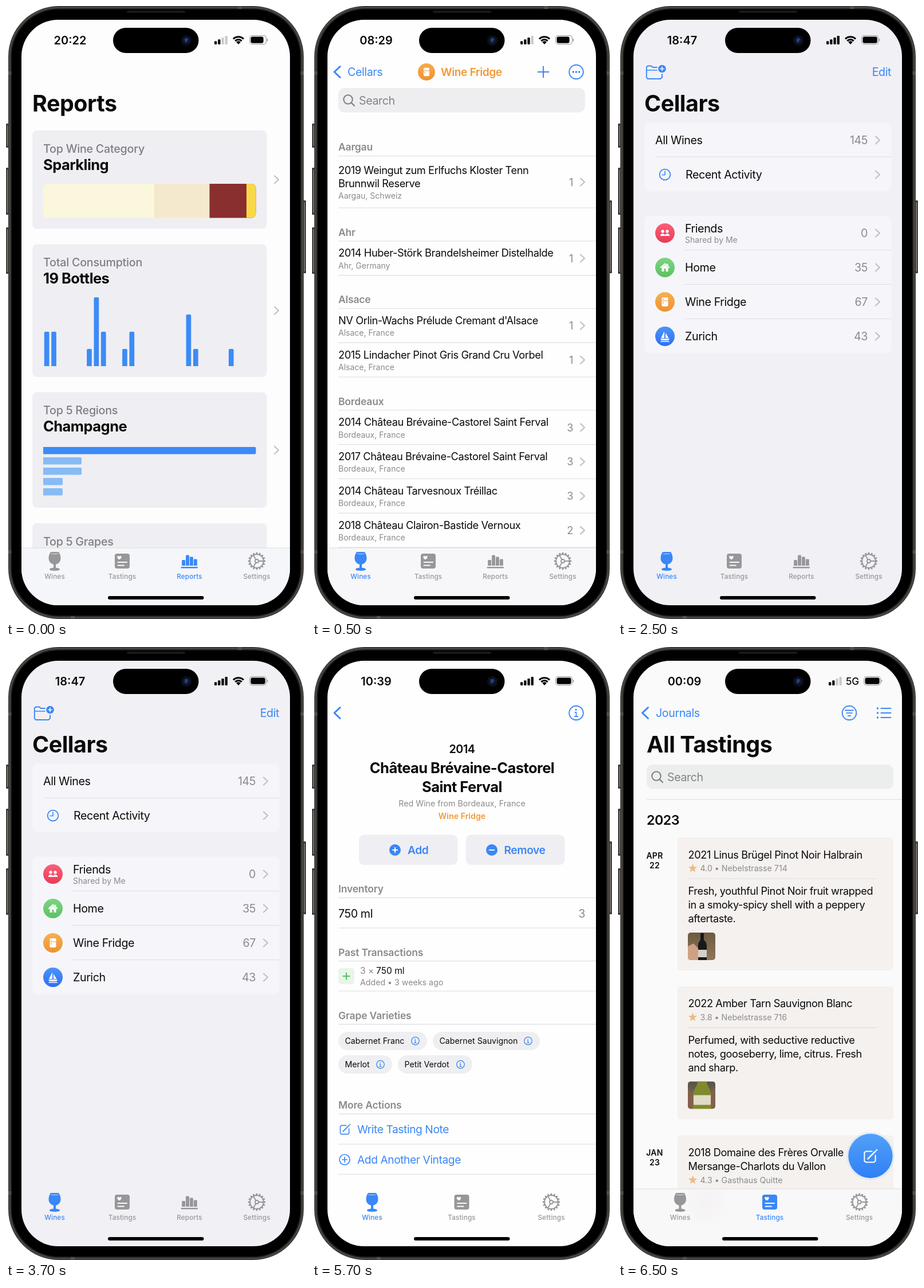
Write an HTML page with a canvas that moves like this. It is 524 px wide and 1069 px high and loops after 8000 ms.

```html
<!DOCTYPE html>
<html lang="en">
<head>
<meta charset="utf-8">
<title>Wine cellar app</title>
<style>
html, body { margin: 0; width: 100%; height: 100%; overflow: hidden; background: #fff; }
canvas { display: block; width: 524px; height: 1069px; }
</style>
</head>
<body>
<canvas id="stage"></canvas>
<script>
const W = 524, H = 1069;
const canvas = document.getElementById('stage');
const ratio = window.devicePixelRatio || 1;
canvas.width = W * ratio;
canvas.height = H * ratio;
const c = canvas.getContext('2d');

const BLUE = '#3a87f7', ORANGE = '#f19a38', INK = '#0a0a0a', GRAY = '#8b8b8f';
const TAB = '#97979a', RULE = '#dedee1', CARD = '#efeef2';
const BODY = 18.2, ACTION = 19.2, TITLE = 39.4;

// Text is placed by the middle of its capitals.
function text(s, x, cy, size = 19.7, weight = 400, color = INK, align = 'left', track) {
  const em = track ?? (size < 16 ? 0 : size < 18 ? -0.01 : size < 30 ? -0.022 : -0.012);
  c.font = `${weight} ${size}px Inter, Roboto, sans-serif`;
  c.letterSpacing = em * size + 'px';
  c.textAlign = align;
  c.textBaseline = 'alphabetic';
  c.fillStyle = color;
  c.fillText(s, x, cy + size * 0.364);
}
function box(x, y, w, h, r, fill) {
  c.beginPath();
  c.roundRect(x, y, w, h, r);
  c.fillStyle = fill;
  c.fill();
}
function disc(x, y, r, fill) {
  c.beginPath();
  c.arc(x, y, r, 0, 7);
  c.fillStyle = fill;
  c.fill();
}
function ring(x, y, r, color, lw = 1.8) {
  c.beginPath();
  c.arc(x, y, r, 0, 7);
  c.strokeStyle = color;
  c.lineWidth = lw;
  c.stroke();
}
function line(points, color, lw = 2) {
  c.beginPath();
  for (let i = 0; i < points.length; i += 2) c.lineTo(points[i], points[i + 1]);
  c.strokeStyle = color;
  c.lineWidth = lw;
  c.lineCap = c.lineJoin = 'round';
  c.stroke();
}
function shape(d, fill) {
  c.fillStyle = fill;
  c.fill(new Path2D(d));
}
function at(x, y, draw, k = 1) {
  c.save();
  c.translate(x, y);
  c.scale(k, k);
  draw();
  c.restore();
}
function fade(y, h, top, bottom) {
  const g = c.createLinearGradient(0, y, 0, y + h);
  g.addColorStop(0, top);
  g.addColorStop(1, bottom);
  return g;
}
const rule = (y, x = 46, end = 496) => box(x, y - 0.6, end - x, 1.2, 0, RULE);
const chevron = (x, y) => line([x - 3.5, y - 6.5, x + 3.5, y, x - 3.5, y + 6.5], '#c1c1c5', 2.2);
const back = x => line([x + 10, 105.5, x, 115, x + 10, 124.5], BLUE, 3);
const plus = (x, y, r, color, lw) => {
  line([x - r, y, x + r, y], color, lw);
  line([x, y - r, x, y + r], color, lw);
};
function info(x, y, r, lw) {
  ring(x, y, r, BLUE, lw);
  disc(x - r * 0.04, y - r * 0.46, r * 0.13, BLUE);
  line([x - r * 0.18, y - r * 0.1, x, y - r * 0.1, x, y + r * 0.5], BLUE, lw * 0.9);
  line([x - r * 0.24, y + r * 0.5, x + r * 0.24, y + r * 0.5], BLUE, lw * 0.9);
}
function compose(x, y, color, k) {
  at(x, y, () => {
    line([3, -8, -6, -8, -8, -6, -8, 6, -6, 8, 6, 8, 8, 6, 8, -2], color, 1.7);
    line([-3, 3, 8, -8], color, 2);
    disc(9.8, -9.8, 1.2, color);
  }, k);
}
function search(x, y, fill) {
  box(x, y, 431, 42.5, 11, fill);
  ring(x + 17, y + 20, 7.7, '#7e7e83', 2);
  line([x + 23, y + 26, x + 28, y + 31], '#7e7e83', 2.3);
  text('Search', x + 36, y + 21.7, 19.7, 400, '#838388');
}

// Tab bar
const icons = {
  Wines(color) {
    shape('M-7 -16H7C9.3 -13 10.5 -9 10.5 -5C10.5 1 6.5 5 2 5.6V11.6C6 12 9 13 9 14.6C9 17.8 -9 17.8 -9 14.6C-9 13 -6 12 -2 11.6V5.6C-6.5 5 -10.5 1 -10.5 -5C-10.5 -9 -9.3 -13 -7 -16Z', color);
    line([-6, -13, 0, -12.3, 6, -13], 'rgba(255,255,255,.6)', 1.2);
  },
  Tastings(color) {
    box(-13, -13, 26, 26, 4, color);
    shape('M-5 -2.4C-12 -7 -7.5 -11 -5 -8C-2.5 -11 2 -7 -5 -2.4Z', '#fafafc');
    line([-7.5, 2, 8, 2], '#fafafc', 2);
    line([-7.5, 7.5, 3, 7.5], '#fafafc', 2);
  },
  Reports(color) {
    [10, 18.5, 15.5, 11.5].forEach((h, i) => box(-13.3 + 6.9 * i, 8 - h, 5.9, h, [1.5, 1.5, 0, 0], color));
    box(-15, 10, 29.5, 2.4, 1, color);
  },
  Settings(color) {
    ring(0, 0, 11.8, color, 2);
    ring(0, 0, 3, color, 1.8);
    for (let i = 0; i < 16; i++) {
      c.save();
      c.rotate(i * Math.PI / 8);
      box(12, -1.5, 3.2, 3, 1, color);
      c.restore();
    }
    for (let i = 0; i < 3; i++) {
      const a = i * Math.PI * 2 / 3, x = Math.cos(a), y = Math.sin(a);
      line([x * 3.6, y * 3.6, x * 11, y * 11], color, 1.9);
    }
  }
};
function tabs(active, spots, fill, border) {
  if (fill) box(27, 945, 469, 102, 0, fill);
  if (border) rule(945, border);
  for (const [name, x] of Object.entries(spots)) {
    const color = name === active ? BLUE : TAB;
    at(x, 968, () => icons[name](color));
    text(name, x, 995, 11.7, 500, color, 'center', 0.015);
  }
}
const FOUR = { Wines: 85, Tastings: 203, Reports: 320.5, Settings: 438 };

// Screens
function reports() {
  text('Reports', 46, 170, TITLE, 700);
  const card = (y, h, label, value) => {
    box(46, y, 409.5, h, 8, CARD);
    text(label, 65, y + 31.5, 19.7, 500, '#7f7f83', 'left', -0.012);
    if (value) {
      text(value, 65, y + 59.5, 25.5, 700);
      chevron(472.5, y + (h === 201.5 ? 101 : h / 2));
    }
  };
  card(217, 171.5, 'Top Wine Category', 'Sparkling');
  c.save();
  c.beginPath();
  c.roundRect(65, 310, 371.5, 59.5, 8);
  c.clip();
  [[65, '#fbf7dc'], [259, '#f4e9cc'], [355.5, '#8a2f2f'], [420, '#f9d847']]
    .forEach(([x, fill]) => box(x, 310, 372, 60, 0, fill));
  c.restore();

  card(415.5, 231.5, 'Total Consumption', '19 Bottles');
  const bottles = { 0: 2, 1: 2, 6: 1, 7: 4, 8: 2, 11: 1, 12: 2, 20: 3, 21: 1, 26: 1 };
  for (const [i, n] of Object.entries(bottles))
    box(66.8 + 12.39 * i, 628 - 30 * n, 8.7, 30 * n, [2, 2, 0, 0], '#3c8bf6');

  card(673.5, 201.5, 'Top 5 Regions', 'Champagne');
  [371.5, 67, 67, 34, 34].forEach((w, i) =>
    box(65, 769 + 18 * i, w, 12.6, [0, 2, 2, 0], i ? '#87bbf5' : '#3c8bf6'));

  card(902, 100, 'Top 5 Grapes');
  tabs('Reports', FOUR, '#f5f6fa', 27);
}

function fridge(x, y, k) {
  at(x, y, () => {
    box(-5.5, -8, 11, 16, 2, '#fff');
    box(-5.5, -2.6, 11, 1.1, 0, ORANGE);
    box(-3.5, -6, 1.2, 2.2, 0, ORANGE);
    box(-3.5, 0, 1.2, 3, 0, ORANGE);
  }, k);
}

function wineList() {
  back(39);
  text('Cellars', 62, 115, 19.7, 400, BLUE);
  disc(200, 115, 15, fade(100, 30, '#f6ad4d', '#ee9230'));
  fridge(200, 115, 0.92);
  text('Wine Fridge', 225, 115, ACTION, 600, ORANGE);
  plus(404, 115, 9.5, BLUE, 2);
  ring(461.5, 115, 12.3, BLUE, 1.9);
  [-5.2, 0, 5.2].forEach(d => disc(461.5 + d, 115, 1.8, BLUE));
  search(46, 143, '#eeeef0');

  const head = (s, y) => {
    text(s, 46, y - 15.5, 17.5, 600, GRAY);
    rule(y);
  };
  const count = (n, y) => {
    text(n, 456, y, BODY, 400, GRAY, 'right');
    chevron(472.5, y);
  };
  const row = (y, title, place, n) => {
    text(title, 46, y + 20.8, BODY);
    text(place, 46, y + 42.5, 14, 400, GRAY);
    count(n, y + 30);
    rule(y + 59.7);
  };
  head('Aargau', 261.5);
  text('2019 Weingut zum Erlfuchs Kloster Tenn', 46, 286, BODY);
  text('Brunnwil Reserve', 46, 309.5, BODY);
  text('Aargau, Schweiz', 46, 331, 14, 400, GRAY);
  count('1', 307);
  rule(352);
  head('Ahr', 410);
  row(410, '2014 Huber-Störk Brandelsheimer Distelhalde', 'Ahr, Germany', '1');
  head('Alsace', 527.5);
  row(527.5, "NV Orlin-Wachs Prélude Cremant d'Alsace", 'Alsace, France', '1');
  row(587.3, '2015 Lindacher Pinot Gris Grand Cru Vorbel', 'Alsace, France', '1');
  head('Bordeaux', 705);
  [['2014 Château Brévaine-Castorel Saint Ferval', '3'],
   ['2017 Château Brévaine-Castorel Saint Ferval', '3'],
   ['2014 Château Tarvesnoux Tréillac', '3'],
   ['2018 Château Clairon-Bastide Vernoux', '2']]
    .forEach(([name, n], i) => row(705 + 59.8 * i, name, 'Bordeaux, France', n));
  tabs('Wines', FOUR, '#f7f7f9', 27);
}

const badges = [
  ['Friends', '0', '#f9607a', '#ea3c55', () => {
    [-4, 4].forEach(x => {
      disc(x, -3, 2.7, '#fff');
      shape(`M${x - 4.3} 5C${x - 4} -0.5 ${x + 4} -0.5 ${x + 4.3} 5Z`, '#fff');
    });
  }],
  ['Home', '35', '#7ed483', '#5cc163', () => {
    line([-7.5, 0, 0, -6.5, 7.5, 0], '#fff', 1.8);
    shape('M-5.5 0L0 -4.6L5.5 0V7H1.6V2H-1.6V7H-5.5Z', '#fff');
    box(3.5, -6.5, 2, 4, 0, '#fff');
  }],
  ['Wine Fridge', '67', '#f7b04f', '#ee9231', () => fridge(0, 0, 1)],
  ['Zurich', '43', '#4a94f8', '#2f6ff0', () => {
    shape('M-1 -9V3H-7Z M1 -6L6.5 3H1Z M-8 4H8L6 7H-6Z', '#fff');
    line([-7, 9, 7, 9], '#fff', 1.3);
  }]
];

function cellars() {
  line([74, 127, 52, 127, 49.8, 124.8, 49.8, 106.5, 52, 104.5, 58, 104.5, 61, 107, 68, 107], BLUE, 1.9);
  line([74, 127, 77, 124.5, 77, 119], BLUE, 1.9);
  line([50, 112, 68, 112], BLUE, 1.7);
  disc(77, 109.5, 6.8, BLUE);
  plus(77, 109.5, 3.2, '#fff', 1.6);
  text('Edit', 477, 115, 19.7, 400, BLUE, 'right');
  text('Cellars', 46, 170, TITLE, 700);

  box(46, 203, 431.5, 120.5, 10, '#f6f6fa');
  text('All Wines', 65, 234);
  text('145', 436, 234, 19.7, 400, GRAY, 'right');
  chevron(453.5, 234);
  rule(263, 65, 477);
  ring(82, 294, 9.4, BLUE, 1.8);
  line([82, 288, 82, 294.5, 77, 294.5], BLUE, 1.6);
  text('Recent Activity', 118, 294);
  chevron(453.5, 294);

  box(46, 365.5, 431.5, 240, 10, '#f6f6fa');
  badges.forEach(([name, n, top, bottom, icon], i) => {
    const y = 396 + 60 * i;
    disc(82, y, 17, fade(y - 17, 34, top, bottom));
    at(82, y, icon);
    text(name, 117, i ? y : 388);
    text(n, 436, y, 19.7, 400, GRAY, 'right');
    chevron(453.5, y);
    if (i) rule(y - 30.5, 116, 477);
  });
  text('Shared by Me', 117, 408, 14, 400, GRAY);
  tabs('Wines', FOUR);
}

function wine() {
  back(39);
  info(461.5, 115, 12.3, 1.9);
  text('2014', 262, 178, 19.7, 600, INK, 'center');
  text('Château Brévaine-Castorel', 262, 211, 25.5, 700, INK, 'center');
  text('Saint Ferval', 262, 244, 25.5, 700, INK, 'center');
  text('Red Wine from Bordeaux, France', 262, 273, 14.2, 400, GRAY, 'center');
  text('Wine Fridge', 262, 295, 14.2, 600, ORANGE, 'center');

  box(82, 327.5, 172.5, 52.5, 9, CARD);
  box(269, 327.5, 172.5, 52.5, 9, CARD);
  disc(145, 354, 10, BLUE);
  plus(145, 354, 4, '#fff', 2);
  text('Add', 167, 354, ACTION, 600, BLUE);
  disc(314, 354, 10, BLUE);
  line([310, 354, 318, 354], '#fff', 2);
  text('Remove', 335.5, 354, ACTION, 600, BLUE);

  [['Inventory', 422], ['Past Transactions', 532.3], ['Grape Varieties', 642.5], ['More Actions', 799]]
    .forEach(([s, y]) => {
      text(s, 46, y, 17.5, 600, GRAY);
      rule(y + 15.4);
    });
  text('750 ml', 46, 464.5);
  text('3', 477, 464.5, 19.7, 400, GRAY, 'right');
  rule(490);

  box(46, 560, 28, 28, 5, '#e8f6e9');
  plus(60, 574, 5.6, '#56bf5d', 2);
  text('3 ×', 84, 564.5, 15.6, 400, GRAY);
  text('750 ml', 112, 564.5, 15.6);
  text('Added • 3 weeks ago', 84, 585, 14.2, 400, GRAY);
  rule(600);

  [['Cabernet Franc', 46, 671, 155], ['Cabernet Sauvignon', 211, 671, 187],
   ['Merlot', 46, 712, 94], ['Petit Verdot', 150, 712, 130]].forEach(([s, x, y, w]) => {
    box(x, y, w, 32, 16, '#efeff1');
    text(s, x + 11.5, y + 16, 14.2);
    info(x + w - 20.5, y + 16, 6.8, 1.3);
  });

  compose(57, 842, BLUE, 0.95);
  text('Write Tasting Note', 79, 841.5, ACTION, 400, BLUE);
  rule(867);
  ring(57, 894, 9, BLUE, 1.7);
  plus(57, 894, 4.3, BLUE, 1.7);
  text('Add Another Vintage', 79, 894, ACTION, 400, BLUE);
  rule(919.5);
  tabs('Wines', { Wines: 105, Tastings: 261.5, Settings: 418 });
}

function star(x, y, r) {
  c.beginPath();
  for (let i = 0; i < 10; i++) {
    const a = i * Math.PI / 5 - Math.PI / 2, q = i % 2 ? r * 0.42 : r;
    c.lineTo(x + q * Math.cos(a), y + q * Math.sin(a));
  }
  c.fillStyle = '#e9bd85';
  c.fill();
}
function photo(x, y, [top, bottom, hand, glass, label], wide) {
  c.save();
  c.beginPath();
  c.roundRect(x, y, 48, 48, 5);
  c.clip();
  c.translate(x, y);
  box(0, 0, 48, 48, 0, fade(0, 48, top, bottom));
  if (wide) {
    shape('M17 0H33C33 9 41 14 41 24V48H9V24C9 14 17 9 17 0Z', glass);
    box(10, 24, 30, 17, 1, label);
    shape('M0 14C7 16 11 26 9 48H0Z M48 10C40 18 39 32 41 48H48Z', hand);
  } else {
    shape('M0 24L10 19L20 30L18 48H0Z', hand);
    shape('M22 1H28V13C33 17 33 20 33 26V48H18V26C18 20 18 17 22 13Z', glass);
    box(18, 30, 15, 13, 0, label);
  }
  c.restore();
}

function tastings() {
  back(42.5);
  text('Journals', 66, 115, 19.7, 400, BLUE);
  ring(404, 115, 12.3, BLUE, 1.9);
  [7, 4.8, 2.2].forEach((w, i) => line([404 - w, 110.5 + 4.7 * i, 404 + w, 110.5 + 4.7 * i], BLUE, 1.8));
  [107, 115, 123].forEach(y => {
    disc(453.5, y, 1.7, BLUE);
    line([459.5, y, 476.5, y], BLUE, 2);
  });
  text('All Tastings', 50, 170, TITLE, 700);
  search(50, 205, '#eceeed');
  rule(266, 50);
  text('2023', 50, 302, 23.3, 600);

  const date = (month, day, y) => {
    text(month, 64, y, 14, 600, INK, 'center', 0.02);
    text(day, 64, y + 17, 14, 600, INK, 'center', 0.02);
  };
  const note = (y, h, titles, meta, body = []) => {
    box(104, y, 377, h, 5, '#f5f1ef');
    titles.forEach((s, i) => text(s, 122.5, y + 30 + 24 * i, BODY));
    const my = y + 30 + 24 * titles.length;
    star(130.5, my, 8.2);
    text(meta, 143.5, my, 14.2, 400, GRAY);
    if (body.length) rule(y + 72, 122, 452);
    body.forEach((s, i) => text(s, 122.5, y + 93.5 + 24 * i, BODY));
  };
  date('APR', '22', 363.5);
  note(332, 232, ['2021 Linus Brügel Pinot Noir Halbrain'], '4.0 • Nebelstrasse 714',
    ['Fresh, youthful Pinot Noir fruit wrapped', 'in a smoky-spicy shell with a peppery', 'aftertaste.']);
  photo(122, 498, ['#6e5a40', '#8d7858', '#cfa184', '#17191a', '#d3d0ca']);
  note(591.7, 232, ['2022 Amber Tarn Sauvignon Blanc'], '3.8 • Nebelstrasse 716',
    ['Perfumed, with seductive reductive', 'notes, gooseberry, lime, citrus. Fresh', 'and sharp.']);
  photo(122, 757.5, ['#595248', '#8a7866', '#83604c', '#7f8a2d', '#e2dac4'], true);
  date('JAN', '23', 882);
  note(851.5, 110, ['2018 Domaine des Frères Orvalle', 'Mersange-Charlots du Vallon'], '4.3 • Gasthaus Quitte');

  tabs('Tastings', { Wines: 108.5, Tastings: 265, Settings: 421.5 }, '#f8f8f9', 30);
  const blush = c.createRadialGradient(152, 968, 0, 152, 968, 45);
  blush.addColorStop(0, 'rgba(245,238,234,.35)');
  blush.addColorStop(1, 'rgba(245,238,234,0)');
  c.globalCompositeOperation = 'multiply';
  box(107, 946, 90, 70, 0, blush);
  c.globalCompositeOperation = 'source-over';

  disc(441, 887.5, 42, 'rgba(205,222,246,.45)');
  disc(441, 887.5, 38.7, fade(849, 77, '#52a1f8', '#2f7ff6'));
  compose(440, 889, '#fff', 1.2);
}

// Device
function body() {
  [[0, 205, 42], [0, 282, 82], [0, 386, 81], [519, 339, 127]]
    .forEach(([x, y, h]) => {
      box(x, y, 5, h, 1.5, '#3c3a38');
      box(x + 1.5, y + 3, 2, h - 6, 1, '#77746f');
    });
  [[0, '#3b3936'], [1.5, '#4a4743'], [4, '#23211f'], [6, '#000']]
    .forEach(([d, fill]) => box(4 + d, d, 516 - 2 * d, H - 2 * d, 88 - d, fill));
  [[4, 114], [4, 949], [515, 114], [515, 949]].forEach(([x, y]) => box(x, y, 5, 6, 0, '#55524e'));
  [[405, 0], [113, 1064]].forEach(([x, y]) => box(x, y, 7, 5, 0, '#55524e'));
  box(211, 8, 102, 4, 2, '#191919');
}
function status({ time, bars, level, dx = 0, cell }) {
  text(time, 112 + dx, 59.5, 20, 600, INK, 'center', 0);
  for (let i = 0; i < 4; i++)
    box(364 + dx + 6.2 * i, 61.3 - 3.1 * i, 4.3, 5.7 + 3.1 * i, 1.2, i < bars ? '#050505' : '#cbcbcd');
  let bx = 425;
  if (cell) {
    text('5G', 398, 59.7, 17.3, 500);
    bx = 429;
  } else {
    c.lineCap = 'butt';
    [[8, 3], [12.7, 3]].forEach(([r, lw]) => {
      c.beginPath();
      c.arc(406, 66.5, r, -Math.PI * 0.75, -Math.PI * 0.25);
      c.strokeStyle = '#050505';
      c.lineWidth = lw;
      c.stroke();
    });
    shape('M406 67L402.2 62.8C404.2 60.8 407.8 60.8 409.8 62.8Z', '#050505');
  }
  c.beginPath();
  c.roundRect(bx + 0.6, 51.6, 29, 15, 4.5);
  c.strokeStyle = '#a3a3a6';
  c.lineWidth = 1.2;
  c.stroke();
  box(bx + 2.5, 53.5, 25.2 * level, 11.2, 3, '#050505');
  box(bx + 30.7, 56.7, 1.8, 5, [0, 1.8, 1.8, 0], '#a3a3a6');
}
function island() {
  box(187, 38, 149.5, 44, 22, '#000');
  disc(315, 60, 9.5, '#0b0d18');
  disc(315, 60, 5.8, '#111a38');
  disc(315, 58.5, 2.8, '#24417c');
  disc(314, 61.5, 1.2, '#3a5c96');
}

const scenes = [
  { end: 500, draw: reports, bg: '#fdfdfe', time: '20:22', bars: 2, level: 0.88 },
  { end: 2500, draw: wineList, bg: '#fefefe', time: '08:29', bars: 3, level: 0.88 },
  { end: 4500, draw: cellars, bg: '#f1f0f5', time: '18:47', bars: 4, level: 1 },
  { end: 6500, draw: wine, bg: '#fefefe', time: '10:39', bars: 4, level: 1 },
  { end: 8000, draw: tastings, bg: '#fafafa', time: '00:09', bars: 2, level: 1, dx: 4, cell: true }
];

function render(ms) {
  const scene = scenes.find(s => ms < s.end);
  c.setTransform(ratio, 0, 0, ratio, 0, 0);
  c.fillStyle = '#fff';
  c.fillRect(0, 0, W, H);
  body();
  c.save();
  c.beginPath();
  c.roundRect(27, 24, 469, 1021, 64);
  c.clip();
  box(27, 24, 469, 1021, 0, scene.bg);
  scene.draw();
  status(scene);
  box(178 + (scene.dx || 0), 1029, 167.5, 6, 3, '#000');
  c.restore();
  island();
}

const start = performance.now();
function tick() {
  render((performance.now() - start) % 8000);
  requestAnimationFrame(tick);
}
tick();
</script>
</body>
</html>
```
